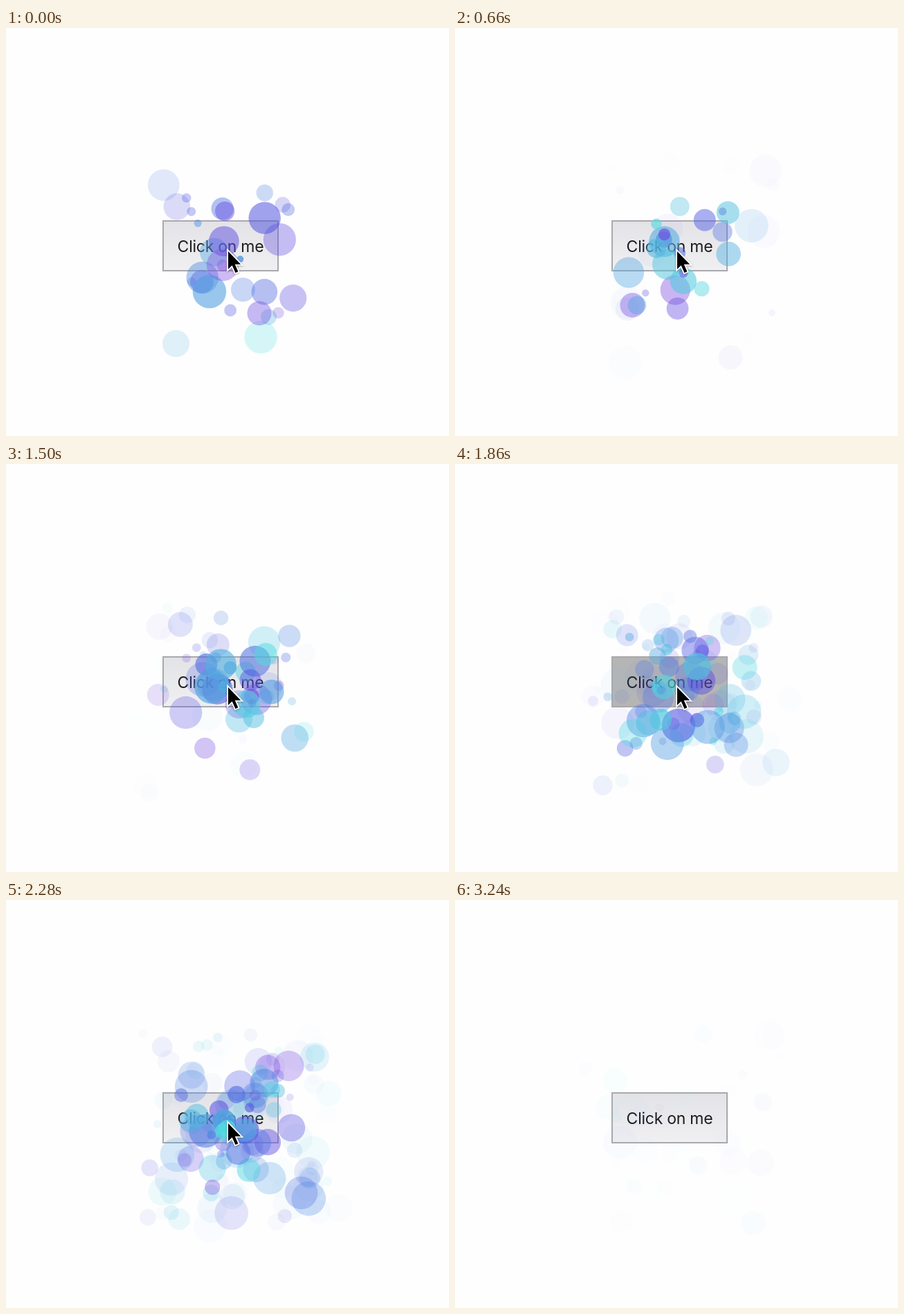
Animation of 640 by 590 pixels, one loop 3300 ms. Source, as an HTML page with a canvas:

```html
<!DOCTYPE html>
<html lang="en">
<head>
<meta charset="utf-8">
<title>Particle button</title>
<style>
  html, body { margin: 0; width: 100%; height: 100%; overflow: hidden; background: #fefefe; }
  canvas { display: block; }
</style>
</head>
<body>
<canvas id="stage" width="640" height="590"></canvas>
<script>
const ctx = document.getElementById('stage').getContext('2d');
const LOOP = 3300, STEP = 60, PER_BURST = 30, PRESS = 80;
const ORIGIN = { x: 321, y: 323 };
const clicks = [-200, 480, 1200, 1400, 1600, 1740, 1900, 2060, 2200];

let seed = 41;
function random(min, max) {
  seed = (seed * 16807) % 2147483647;
  return min + (max - min) * seed / 2147483647;
}

// cubic-bezier(0, .9, .57, 1)
function ease(progress) {
  let low = 0, high = 1;
  for (let i = 0; i < 24; i++) {
    const s = (low + high) / 2;
    if (1.71 * s * s * (1 - s) + s ** 3 < progress) low = s; else high = s;
  }
  return 2.7 * low * (1 - low) ** 2 + 3 * low * low * (1 - low) + low ** 3;
}

// The end point is set for the circle's top left corner, hence the added radius.
function makeParticle(click) {
  const r = random(5, 25);
  return {
    r,
    color: `hsl(${random(180, 262)}, 70%, 60%)`,
    dx: random(-150, 150) + r,
    dy: random(-150, 150) + r,
    life: random(500, 1500),
    start: click + random(0, 200)
  };
}

const particles = clicks.flatMap(click =>
  Array.from({ length: PER_BURST }, () => makeParticle(click)));

function drawButton(pressed) {
  const fill = ctx.createLinearGradient(0, 278, 0, 352);
  fill.addColorStop(0, pressed ? '#b5b5b5' : '#e3e3e7');
  fill.addColorStop(1, pressed ? '#b5b5b5' : '#f0f0f2');
  ctx.fillStyle = fill;
  ctx.fillRect(226, 278, 168, 74);
  ctx.strokeStyle = '#a9a9ad';
  ctx.lineWidth = 2;
  ctx.strokeRect(227, 279, 166, 72);
  ctx.fillStyle = '#1c1c1f';
  ctx.font = '23px Inter, Roboto, sans-serif';
  ctx.letterSpacing = '-0.25px';
  ctx.textAlign = 'center';
  ctx.fillText('Click on me', 310, 324);
}

function drawParticle({ r, color, dx, dy, life, start }, t) {
  const progress = (t - start) / life;
  if (progress < 0 || progress >= 1) return;
  const e = ease(progress);
  ctx.globalAlpha = 0.9 * (1 - e);
  ctx.fillStyle = color;
  ctx.beginPath();
  ctx.arc(ORIGIN.x + dx * e, ORIGIN.y + dy * e, r, 0, Math.PI * 2);
  ctx.fill();
  ctx.globalAlpha = 1;
}

const arrow = new Path2D('M0 0V28.5L6.3 22.6L11.6 34.4L16 32.4L10.8 20.8H20.2Z');
function drawCursor(t) {
  const k = Math.max(0, (t - 2940) / 270);
  if (k >= 1) return;
  ctx.save();
  ctx.translate(321 + 146 * k, 323 + 270 * k * (0.8 + 0.2 * k));
  ctx.scale(0.9, 0.9);
  ctx.shadowColor = 'rgba(0, 0, 0, .3)';
  ctx.shadowBlur = 3;
  ctx.shadowOffsetY = 1;
  ctx.strokeStyle = '#fff';
  ctx.lineWidth = 4;
  ctx.stroke(arrow);
  ctx.shadowColor = 'transparent';
  ctx.fillStyle = '#000';
  ctx.fill(arrow);
  ctx.restore();
}

function draw(now) {
  const t = Math.floor((now % LOOP) / STEP) * STEP;
  ctx.fillStyle = '#fefefe';
  ctx.fillRect(0, 0, 640, 590);
  drawButton(clicks.some(click => t >= click - PRESS && t < click));
  for (const p of particles) drawParticle(p, t);
  drawCursor(t);
}

const begin = performance.now();
function tick() {
  draw(performance.now() - begin);
  requestAnimationFrame(tick);
}
tick();
</script>
</body>
</html>
```
